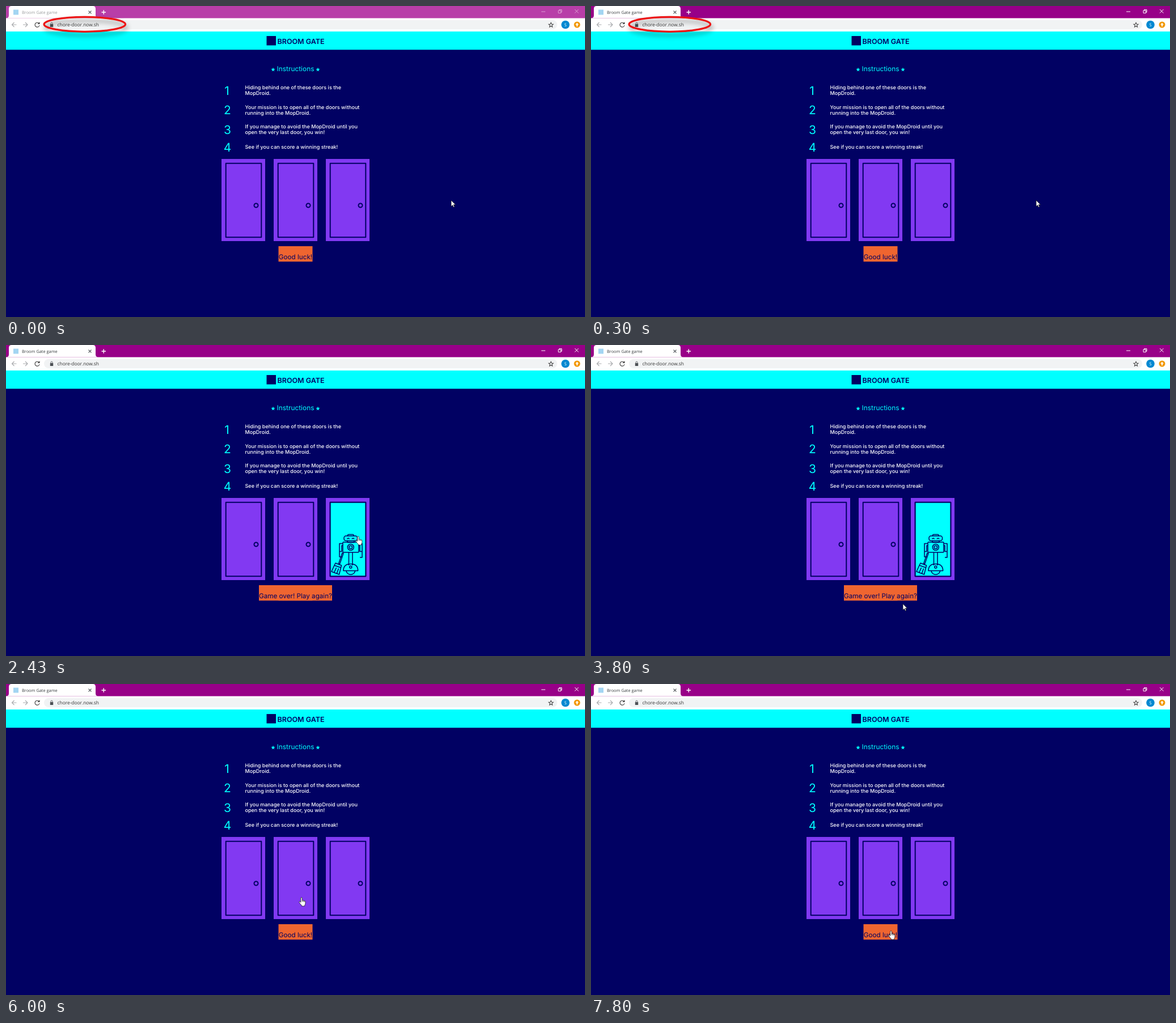
Recreate the animation shown at these times as an HTML page. Size 1021 by 549 pixels, loop 8 s.

```html
<!DOCTYPE html>
<html lang="en">
<head>
<meta charset="utf-8">
<title>Broom Gate game</title>
<style>
  html, body { margin: 0; width: 100%; height: 100%; overflow: hidden; background: #010163; }
  svg { display: block; width: 1021px; height: 549px; font-family: Inter, "Open Sans", sans-serif; text-rendering: geometricPrecision; }
  .ui { font-family: "Open Sans", "Noto Sans", sans-serif; }
  .rules { font-size: 9.05px; font-weight: 500; fill: #fff; }
  .digits { font-size: 21px; fill: #0ff; text-anchor: middle; }
  .button { font-size: 11.7px; fill: #010163; text-anchor: middle; }
  .line { fill: none; stroke: #010163; stroke-width: 1.5; stroke-linejoin: round; }
  .icon { fill: none; stroke: #5f6368; stroke-width: 1.2; }
  .anim { animation: 8s linear infinite; }
  .cut { animation: 8s step-end infinite; }

  /* window gaining focus */
  .bar { animation-name: bar; }
  @keyframes bar { 0%, .3% { fill: #b83ea8 } 2%, 100% { fill: #980088 } }
  .focus { animation-name: focus; }
  @keyframes focus { 0%, .3% { opacity: .5 } 2%, 100% { opacity: 1 } }

  .black { animation-name: black; }
  @keyframes black { 0% { opacity: 0 } 2.5% { opacity: 1 } 3.75%, 100% { opacity: 0 } }
  .mark { animation-name: mark; }
  @keyframes mark { 0%, 7.3% { opacity: 1 } 8.4%, 100% { opacity: 0 } }

  /* game state */
  .first { animation-name: first; }
  @keyframes first { 0% { opacity: 0 } 29.125% { opacity: 1 } 62.5%, 100% { opacity: 0 } }
  .second { animation-name: second; }
  @keyframes second { 0% { opacity: 0 } 77.875% { opacity: 1 } 96.25%, 100% { opacity: 0 } }

  .pointer { animation-name: pointer; }
  @keyframes pointer {
    0% { transform: translate(785px, 343px) }
    11.25% { transform: translate(785px, 343px); animation-timing-function: ease-in }
    14.1% { transform: translate(745px, 374px) }
    16.5% { transform: translate(670px, 384px); animation-timing-function: ease-out }
    19.1% { transform: translate(628px, 339px) }
    21.25%, 21.6% { transform: translate(616px, 339px) }
    22.5% { transform: translate(611px, 342px) }
    23.8% { transform: translate(623px, 339px) }
    24.1% { transform: translate(621px, 338px) }
    42.1% { transform: translate(621px, 338px); animation-timing-function: ease-in }
    45% { transform: translate(585px, 400px); animation-timing-function: ease-out }
    47.5% { transform: translate(550px, 457px) }
    50% { transform: translate(550px, 457px); animation-timing-function: ease-in-out }
    53.75% { transform: translate(546px, 440px) }
    69.1% { transform: translate(546px, 440px); animation-timing-function: ease-in }
    71.25% { transform: translate(535px, 415px) }
    73.5% { transform: translate(514px, 384px); animation-timing-function: ease-out }
    75% { transform: translate(521px, 377px) }
    87.5% { transform: translate(521px, 377px); animation-timing-function: ease-in }
    91.25% { transform: translate(524px, 405px); animation-timing-function: ease-out }
    95% { transform: translate(530px, 442px) }
    97.5%, 100% { transform: translate(529px, 436px) }
  }
  .hand { animation-name: hand; }
  @keyframes hand {
    0% { opacity: 0 } 18.3% { opacity: 1 } 47.1% { opacity: 0 }
    51.3% { opacity: 1 } 62.5% { opacity: 0 } 71.25%, 100% { opacity: 1 }
  }
  .arrow { animation-name: arrow; }
  @keyframes arrow {
    0% { opacity: 1 } 18.3% { opacity: 0 } 47.1% { opacity: 1 }
    51.3% { opacity: 0 } 62.5% { opacity: 1 } 71.25%, 100% { opacity: 0 }
  }
</style>
</head>
<body>
<svg viewBox="0 0 1021 549" xmlns="http://www.w3.org/2000/svg">
  <defs>
    <g id="door">
      <path d="M0 0h77v145H0z" fill="#8239f2"/>
      <path class="line" d="M7.7 7.7h62.6v130.6H7.7z" style="stroke-width:2"/>
      <circle class="line" cx="61" cy="82" r="3.5" style="stroke-width:2"/>
    </g>
    <g id="robot">
      <path class="line" d="M7.7 7.7h62.6v130.6H7.7z" style="fill:#0ff;stroke-width:2"/>
      <g class="line">
        <path d="M38.500 67.500V66q0-1.500 1.500-1.500h7.500q1.500 0 1.500 1.500v1.500"/>
        <rect x="32" y="67" width="23.500" height="8.500" rx="3.500"/>
        <path d="M37.500 72.500q2-3 4 0M46 72.500q2-3 4 0M38 75.500v3h12v-3"/>
        <rect x="30" y="78" width="28" height="18" rx="1"/>
        <circle cx="43.800" cy="87" r="5.500"/>
        <circle cx="43.800" cy="87" r="2.800"/>
        <path d="M30 80.500h-6v14h4V84h2M58 80.500h6v14h-4V84h-2M24 94.500V104h4.500M64 94.500V105h-4"/>
        <path d="M40.500 96v23M47 96v23"/>
        <path d="M31 128.500q0-12 12.800-12t12.800 12z"/>
        <path d="M36 129a8 8 0 0 0 15.600 0"/>
        <circle cx="43.800" cy="122" r="2"/>
        <path d="M29 97l2 .8-6.500 19-2-.8z"/>
        <path d="M17 115l10.500 4-1 4-11.500-4zM15 119l-5 11 13.500 5 3-12M15 131l3.500-8M19.500 133l3-8.500"/>
      </g>
    </g>
    <path id="star" d="M0-3.500l1 2.400 2.600.2-2 1.700.6 2.500L0 1.900l-2.200 1.400.6-2.500-2-1.700 2.600-.2z"/>
    <filter id="shade" x="-20%" y="-60%" width="140%" height="260%">
      <feDropShadow dx="2" dy="6" stdDeviation="4" flood-color="#000" flood-opacity=".45"/>
    </filter>
  </defs>

  <!-- browser -->
  <path class="bar anim" d="M0 0h1021v22H0z"/>
  <path d="M0 21.500q5 0 5-5V5q0-5 5-5h143q5 0 5 5v11.500q0 5 5 5z" fill="#fff"/>
  <path d="M0 21.500h1021V45H0z" fill="#fff"/>
  <path d="M13 6.500h9v9h-9z" fill="#a3d5f2"/>
  <text class="ui focus anim" x="28" y="13.500" font-size="7.400" fill="#3c4043">Broom Gate game</text>
  <path class="icon" d="M145.500 8.500l5 5m0-5l-5 5"/>
  <path d="M168.500 11h7.500m-3.750-3.750v7.500" stroke="#fff" stroke-width="1.400"/>
  <g class="focus anim" fill="none" stroke="#fff">
    <path d="M944 10h7M1003 6l6.500 6.500m0-6.500l-6.500 6.500"/>
    <path d="M974 8h4.500v4.500H974zM975.500 8V6.500h4.500V11h-1.500"/>
  </g>
  <rect x="67" y="25" width="905" height="16" rx="8" fill="#f1f3f4"/>
  <path class="icon" d="M18.500 33h-8m4-4l-4 4 4 4" style="stroke:#a9abae"/>
  <path class="icon" d="M30 33h8m-4-4l4 4-4 4" style="stroke:#a9abae"/>
  <path class="icon" d="M58 30.500a4 4 0 1 0 1 3.500" style="stroke:#444"/>
  <path d="M59.500 28v4h-4z" fill="#444"/>
  <path d="M77.800 32h5.400v5h-5.400z" fill="#4d5156"/>
  <path class="icon" d="M79 32v-1.300a1.500 1.500 0 0 1 3 0V32" style="stroke-width:1"/>
  <text class="ui" x="90.500" y="36.300" font-size="8.400" fill="#333">chore-door.now.sh</text>
  <use href="#star" transform="translate(961 33.300) scale(1.150)" fill="none" stroke="#444" stroke-width=".9"/>
  <circle cx="986.500" cy="33" r="7.300" fill="#0288d1"/>
  <text class="ui" x="986.500" y="35.800" font-size="7.500" fill="#fff" text-anchor="middle">S</text>
  <circle cx="1007" cy="33" r="5.500" fill="#f29900"/>
  <path d="M1007 29.800l3 3.200h-2v3h-2v-3h-2z" fill="#fff"/>

  <!-- page -->
  <path d="M0 45h1021v32.500H0z" fill="#0ff"/>
  <path d="M0 77.500h1021V549H0z" fill="#010163"/>
  <path d="M459.500 53h16.500v16.500h-16.500z" fill="#010163"/>
  <text x="478.500" y="66.600" font-size="12.500" font-weight="600" fill="#010163">BROOM GATE</text>
  <g fill="#0ff">
    <use href="#star" x="471" y="112"/>
    <use href="#star" x="550" y="112"/>
    <text x="510.500" y="115.200" font-size="11.900" text-anchor="middle">Instructions</text>
  </g>
  <g class="digits">
    <text x="389.500" y="157">1</text>
    <text x="390.500" y="191.200">2</text>
    <text x="390.500" y="225.700">3</text>
    <text x="390.500" y="256.700">4</text>
  </g>
  <g class="rules">
    <text x="421.500" y="147">Hiding behind one of these doors is the</text>
    <text x="421.500" y="157.300">MopDroid.</text>
    <text x="421.500" y="181.500">Your mission is to open all of the doors without</text>
    <text x="421.500" y="191.800">running into the MopDroid.</text>
    <text x="421.500" y="216">If you manage to avoid the MopDroid until you</text>
    <text x="421.500" y="226.300">open the very last door, you win!</text>
    <text x="421.500" y="252.300">See if you can score a winning streak!</text>
  </g>
  <use href="#door" x="380" y="270"/>
  <use href="#door" x="472" y="270"/>
  <use href="#door" x="564" y="270"/>
  <use class="first cut" href="#robot" x="564" y="270"/>
  <use class="second cut" href="#robot" x="472" y="270"/>
  <g class="button">
    <path d="M480.500 424h60v27.300h-60z" fill="#ef6530"/>
    <text x="510.500" y="446.500">Good luck!</text>
    <g id="over" class="first cut">
      <path d="M446 424h129v27.300H446z" fill="#ef6530"/>
      <text x="510.500" y="446.500">Game over! Play again?</text>
    </g>
    <g class="second cut">
      <path d="M446 424h129v27.300H446z" fill="#ef6530"/>
      <text x="510.500" y="446.500">Game over! Play again?</text>
    </g>
  </g>

  <path class="black cut" d="M0 0h1021v549H0z"/>
  <g class="mark anim">
    <ellipse cx="138.800" cy="32.300" rx="71.700" ry="13" fill="none" stroke="#ec1212" stroke-width="3.300" filter="url(#shade)"/>
  </g>

  <g class="pointer anim" fill="#fff" stroke="#111" stroke-width=".7" stroke-linejoin="round">
    <path class="arrow cut" d="M0 0v10.800l2.500-2.300 1.700 3.700 1.700-.8-1.700-3.600h3.400z"/>
    <path class="hand cut" d="M-1.200 1q0-1.300 1.200-1.300T1.200 1v4q1.700-.7 2 .4 1.500-.5 1.900.5 1.600-.3 1.800 1v3q0 2-1.200 3.600V15h-5.500v-1.500Q-2.500 11.500-3.800 8.600q-.6-1.400.5-1.700 1-.2 2.100 1.600zM1.200 5v2.500M3.200 5.400v2.300M5.100 5.900v2"/>
  </g>
</svg>
</body>
</html>
```
